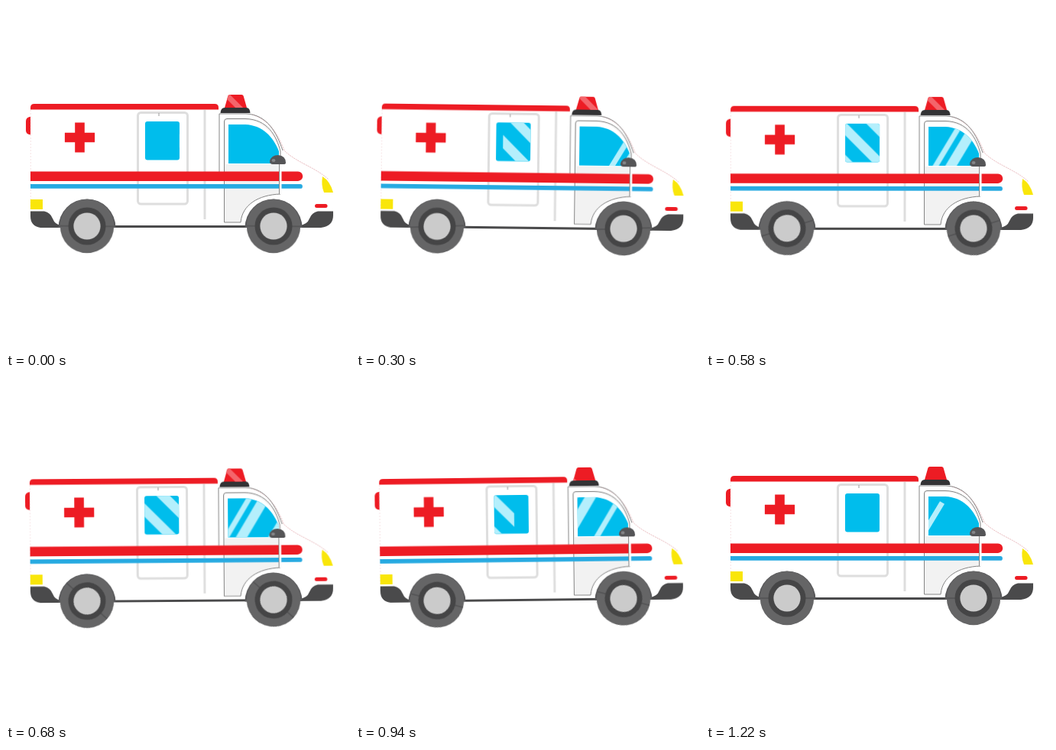
An HTML page without scripts that plays this animation: 450 px wide and 450 px high, repeating every 1.24 s.

```html
<!DOCTYPE html>
<html lang="en">
<head>
<meta charset="utf-8">
<title>Ambulance</title>
<style>
  html, body { margin: 0; width: 100%; height: 100%; overflow: hidden; background: #fff; }
  svg { display: block; width: 100%; height: 100%; }

  .van, .wheel, .sweep { animation: 1240ms linear infinite; }
  .van { transform-origin: 228px 288px; animation-name: sway; }
  .wheel { animation-name: roll; }
  .glass-sweep { animation-name: glass-sweep; }
  .lamp-sweep { animation-name: lamp-sweep; }

  .red { fill: #ed1c24; }
  .blue { fill: #00bdec; }
  .yellow { fill: #f9e60a; }
  .dark { fill: #4a4a4b; }
  .trim { fill: none; stroke: #dedede; stroke-width: 3; }
  .seam { stroke: #858585; stroke-width: 1; }
  .glint { stroke: #b4effc; }

  /* The last pose equals the first and is held for one step. */
  @keyframes sway {
    0%, 98.4%, 100% { transform: none; }
    12.1% { transform: translateY(.8px) rotate(.45deg); }
    24.2% { transform: translateY(1.8px) rotate(.68deg); }
    38.7% { transform: translateY(2.5px) rotate(.5deg); }
    46.8% { transform: translateY(2.9px) rotate(.05deg); }
    54.8% { transform: translateY(3px) rotate(-.4deg); }
    67.7% { transform: translateY(2.4px) rotate(-.72deg); }
    76.6% { transform: translateY(1.8px) rotate(-.64deg); }
    85.5% { transform: translateY(1.1px) rotate(-.4deg); }
  }
  @keyframes roll {
    0% { transform: rotate(0deg); }
    98.4%, 100% { transform: rotate(720deg); }
  }
  @keyframes glass-sweep {
    98.4%, 100% { transform: translateX(-146px); }
  }
  @keyframes lamp-sweep {
    0% { transform: none; }
    24.2% { transform: translateX(5px); }
    54.8% { transform: translateX(1px); }
    67.7% { transform: translateX(-4px); }
    82%, 100% { transform: translateX(-32px); }
  }
</style>
</head>
<body>
<svg viewBox="0 0 450 450" xmlns="http://www.w3.org/2000/svg">
  <defs>
    <path id="cab-glass" d="M291 155H313C335 156 349 170 357 190V199L346 206H291Z"/>
    <rect id="side-glass" x="182" y="151" width="45" height="50.5" rx="3"/>
    <path id="lamp" d="M286 133L290 119Q290.500 116 293 116H308Q310.500 116 311 119L315 133Z"/>
    <clipPath id="cab-clip"><use href="#cab-glass"/></clipPath>
    <clipPath id="side-clip"><use href="#side-glass"/></clipPath>
    <clipPath id="side-bands"><rect x="227" y="140" width="94" height="75"/></clipPath>
    <clipPath id="lamp-clip"><use href="#lamp"/></clipPath>
    <path id="arch" fill="#58585a" d="M-37.500 2A37.500 37.500 0 0 1 37.500 2Z"/>
    <g id="tyre">
      <circle r="35.200" fill="#656566"/>
      <path d="M-35 0H35" stroke="#48484a" stroke-width="1"/>
      <circle r="24.500" fill="#454546"/>
      <circle r="17.600" fill="#cbcbcb"/>
    </g>
  </defs>

  <rect width="450" height="450" fill="#fff"/>
  <g class="van">
    <!-- shell -->
    <path class="red" d="M33 145H31Q26 146 26 151V163Q26 168 33 168.500Z"/>
    <path fill="#fff" d="M32 134H278V140H315C345 142 355 166 364 189C380 205 405 211 422 227Q428 238 428 268V290H32Z"/>
    <path d="M322 142C345 150 355 166 364 189C380 205 405 211 422 227" fill="none" stroke="#d88a90" stroke-width=".6" stroke-dasharray="2 1"/>
    <path d="M32.300 136V268" stroke="#ecc4c6" stroke-width=".5" stroke-dasharray="2 2"/>
    <path class="red" d="M32 135.500V133Q32 128 37 128H273Q278 128 278 133V135.500Z"/>
    <path class="red" d="M90.200 152.400h12.600v13.300h13.300v12.600h-13.300v13.300h-12.600v-13.300h-13.300v-12.600h13.300Z"/>

    <!-- side door -->
    <rect class="trim" x="172.500" y="139.500" width="65" height="119.500" rx="4"/>
    <path class="trim" d="M260 136V279"/>
    <path d="M200 140v4" stroke="#999"/>
    <use class="blue" href="#side-glass"/>
    <g clip-path="url(#side-clip)">
      <g class="sweep glass-sweep glint" stroke-width="12.500">
        <path clip-path="url(#side-bands)" d="M188 137l80 80M231 137l80 80M274 137l80 80"/>
      </g>
    </g>

    <!-- cab -->
    <path class="seam" fill="none" d="M279 217V141H314C342 142 354 166 362 189"/>
    <path class="seam" fill="#f2f2f2" d="M285.500 283V151Q285.500 147.500 289 147.500H313C342 148 354 170 359 190V246C330 247 309 260 307 283Z"/>
    <path fill="#fff" d="M287 207V149H313C339 150 352 170 358 190V207Z"/>
    <use class="blue" href="#cab-glass"/>
    <g clip-path="url(#cab-clip)">
      <g class="sweep glass-sweep glint">
        <path d="M409 141l-48 80" stroke-width="7"/>
        <path d="M429 141l-48 80" stroke-width="13"/>
        <path d="M455 163l-35 58" stroke-width="7"/>
      </g>
    </g>

    <!-- stripes -->
    <path class="red" d="M32 216.500H382a6.200 6.200 0 0 1 0 12.400H32Z"/>
    <path fill="#27aae1" d="M32 233H385a2.900 2.900 0 0 1 0 5.800H32Z"/>
    <path d="M359 207V246" stroke="#fff" stroke-width="3"/>
    <path d="M357.500 207V246" class="seam"/>

    <!-- mirror -->
    <path fill="#555557" d="M345 203Q347 195 356 195Q366 196 366 205Q366 207 363 207H349Q345 207 345 203Z"/>
    <ellipse cx="350" cy="202" rx="2.500" ry="2" fill="#858587"/>

    <!-- lights and bumpers -->
    <path class="yellow" d="M414 223Q424 229 428 244H416Q412 235 414 223Z"/>
    <rect class="yellow" x="32" y="253" width="16" height="13"/>
    <rect class="red" x="404" y="259" width="16.500" height="5" rx="2.500"/>
    <path class="dark" d="M58 286H400V290H58Z"/>
    <path fill="#fff" d="M70 284H390V287H70Z"/>
    <path class="dark" d="M32 268.500H50Q58 270 61 278Q64 286 72 287V290H45Q32 288 32 275Z"/>
    <path class="dark" d="M428 268.500H408Q400 270 397 278Q394 286 384 287V290H412Q428 288 428 274Z"/>

    <!-- beacon -->
    <path fill="#333335" d="M280.500 140Q281 133 286 133H314.500Q319 133 319.500 140Z"/>
    <use class="red" href="#lamp"/>
    <g clip-path="url(#lamp-clip)">
      <path class="sweep lamp-sweep" d="M284 112L312 140" stroke="#f4656b" stroke-width="7"/>
    </g>

    <g transform="translate(106 288)">
      <use href="#arch"/>
      <g class="wheel"><use href="#tyre"/></g>
    </g>
    <g transform="translate(350 288)">
      <use href="#arch"/>
      <g class="wheel"><use href="#tyre"/></g>
    </g>
  </g>
</svg>
</body>
</html>
```
